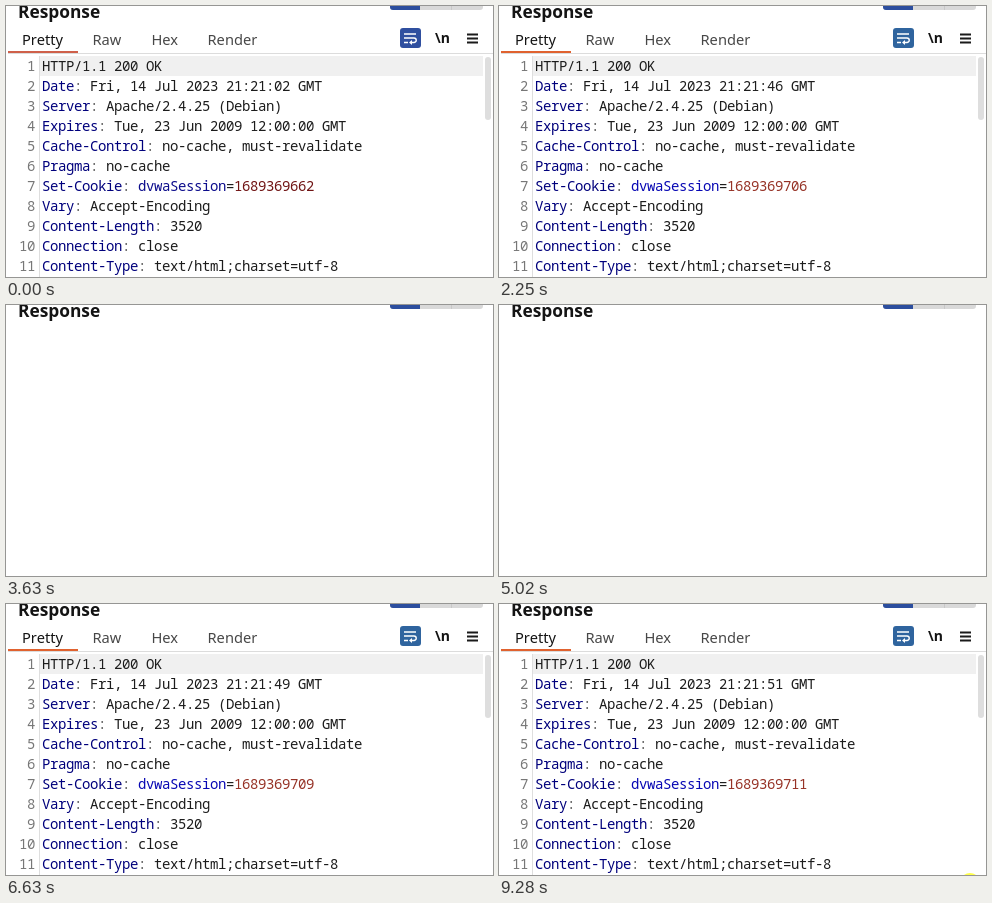
Recreate the animation shown at these times as an HTML page. Size 487 px wide and 271 px high, loop 9.74 s.

```html
<!DOCTYPE html>
<html lang="en">
<head>
<meta charset="utf-8">
<title>Response pane</title>
<style>
  html, body { margin: 0; width: 100%; height: 100%; overflow: hidden; background: #fff; }
  svg { display: block; width: 487px; height: 271px; }
  text { white-space: pre; fill: #141414; }
  .ui { font-family: "Noto Sans", "Open Sans", sans-serif; font-size: 14.67px; }
  .code { font-family: "Noto Sans Mono", "DejaVu Sans Mono", monospace; font-size: 14px; letter-spacing: -.4px; }
  .code text { fill: #1c1c1c; }
  .code .number { fill: #777; }
  .name { fill: #00007c; }
  .colon { fill: #555; }
  .key { fill: var(--key); }
  .value { fill: var(--value); }
  svg { --key: #0c0c8c; --value: #701414; --accent: #cf604a; --button: #2f4f9f; }
  svg.later { --key: #0808b4; --value: #963226; --accent: #e0622f; --button: #2f649e; }
</style>
</head>
<body>
<svg id="stage" viewBox="0 0 487 271">
  <text class="ui" x="12" y="12" style="font-size:17.33px;font-weight:700">Response</text>
  <path d="M384 0h93v1q0 3-3 3h-87q-3 0-3-3z" fill="#d9d9d9"/>
  <path d="M384 0h30v4h-27q-3 0-3-3z" fill="#2c4e9e"/>
  <path d="M445.5 0v4" stroke="#c8c8c8"/>

  <g id="pane">
    <g class="ui">
      <text x="16" y="38.5">Pretty</text>
      <g style="opacity:.78">
        <text x="86.5" y="38.5">Raw</text>
        <text x="145.5" y="38.5">Hex</text>
        <text x="201.5" y="38.5">Render</text>
      </g>
      <text x="429" y="37" style="font-size:14px;font-weight:600">\n</text>
    </g>
    <path d="M2 47.5H487" stroke="#dcdcdc"/>
    <rect x="2" y="45" width="70" height="2" fill="var(--accent)"/>
    <rect x="394" y="22" width="21" height="20" rx="3" fill="var(--button)"/>
    <path d="M398 28h12M398 32h10a2.2 2.2 0 0 1 0 4.5h-3M398 36.5h4" fill="none" stroke="#fff" stroke-width="1.4"/>
    <path d="M403 36.5l3-2.6v5.2z" fill="#fff"/>
    <path d="M461 28.5h11M461 32.5h11M461 36.5h11" stroke="#1a1a1a" stroke-width="1.8"/>
    <rect x="34" y="50" width="443" height="20" fill="#f0f0f0"/>
    <path d="M33.5 50V271" stroke="#dedede"/>
    <rect x="479" y="51" width="6" height="63" rx="3" fill="#dedede"/>
    <g id="lines" class="code"></g>
  </g>
  <circle id="highlight" r="10" fill="#ffff4a"/>
  <path id="arrow" d="M.5 .5v16l3.8-3.4 2.6 6.2 2.5-1-2.6-6h5.2z" fill="#fff" stroke="#222"/>
</svg>
<script>
const LOOP = 9740;
const byId = id => document.getElementById(id);

const headers = [
  'HTTP/1.1 200 OK',
  'Date: Fri, 14 Jul 2023 21:21:<tspan id="seconds"></tspan> GMT',
  'Server: Apache/2.4.25 (Debian)',
  'Expires: Tue, 23 Jun 2009 12:00:00 GMT',
  'Cache-Control: no-cache, must-revalidate',
  'Pragma: no-cache',
  'Set-Cookie: <tspan class="key">dvwaSession</tspan>=<tspan class="value" id="session"></tspan>',
  'Vary: Accept-Encoding',
  'Content-Length: 3520',
  'Connection: close',
  'Content-Type: text/html;charset=utf-8'
];
byId('lines').innerHTML = headers.map((header, i) => {
  const y = 65 + 20 * i;
  const number = String(i + 1).padStart(2);
  const styled = header.replace(/^([\w-]+):/, '<tspan class="name">$1</tspan><tspan class="colon">:</tspan>');
  return `<text class="number" x="13" y="${y}">${number}</text><text x="36" y="${y}">${styled}</text>`;
}).join('');
const seconds = byId('seconds');
const session = byId('session');

// Each response: arrival time, server clock seconds, blank time before arrival
const responses = [
  [0, 2, 0], [1790, 45, 70], [2250, 46, 0], [3240, 47, 60], [3700, 47, 70],
  [4100, 48, 0], [5090, 49, 70], [5690, 49, 70], [7430, 51, 70]
];

// Pointer sightings: start, end, x, y
const highlights = [[70, 130, 358, 261], [9280, LOOP, 471, 279]];
const arrows = [
  [6090, 6280, 430, 178], [6280, 6350, 370, 178], [6350, 6420, 333, 178],
  [6420, 6490, 390, 178], [6490, 6560, 458, 178], [6560, 6630, 474, 211]
];

function place(element, sightings, t) {
  const seen = sightings.find(([from, to]) => t >= from && t < to);
  element.style.display = seen ? '' : 'none';
  if (seen) element.setAttribute('transform', `translate(${seen[2]} ${seen[3]})`);
}

function draw(t) {
  const clock = responses.findLast(([at]) => at <= t)[1];
  const blank = responses.some(([at, , gap]) => t >= at - gap && t < at);
  seconds.textContent = String(clock).padStart(2, '0');
  session.textContent = 1689369660 + clock;
  byId('pane').style.display = blank ? 'none' : '';
  byId('stage').classList.toggle('later', t >= 1720);
  place(byId('highlight'), highlights, t);
  place(byId('arrow'), arrows, t);
}

const start = performance.now();
function tick() {
  draw((performance.now() - start) % LOOP);
  requestAnimationFrame(tick);
}
tick();
</script>
</body>
</html>
```
